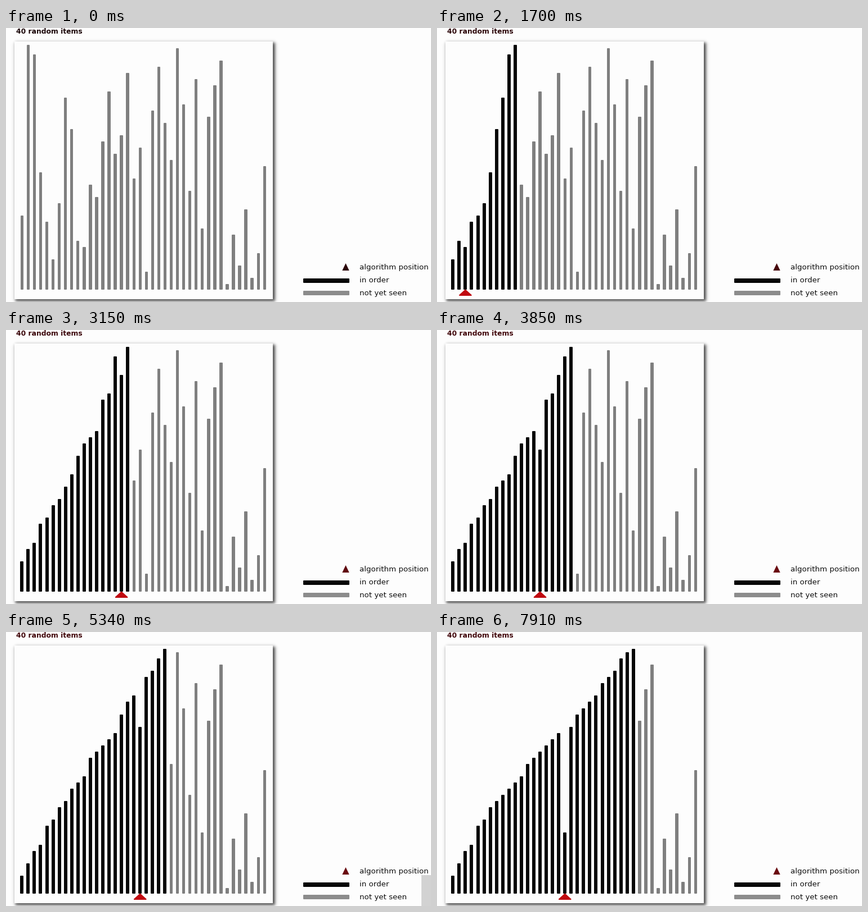
These frames come from a looping animation (755 by 488 pixels, 7990 ms). A matplotlib script:

```python
import numpy as np
import matplotlib.pyplot as plt
from matplotlib.animation import FuncAnimation
from matplotlib.collections import PolyCollection
from matplotlib.patches import Polygon, Rectangle

W, H, DPI = 755, 488, 64
PT = 72 / DPI                      # points per pixel
LOOP, INTERVAL = 7990, 17

# the shuffled ranks to be sorted
ITEMS = [12, 40, 38, 19, 11, 5, 14, 31, 26, 8, 7, 17, 15, 24, 32, 22, 25, 35, 18, 23,
         3, 29, 36, 27, 21, 39, 30, 16, 34, 10, 28, 33, 37, 1, 9, 4, 13, 2, 6, 20]
BLACK, GRAY = "#060606", "#7f7f7f"
X0, PITCH, TOP, FLOOR = 28.3, 11.05, 30, 466.3


def insertion_states(items):
    """Every state of the sort: (items, how many are in order, position)."""
    a = list(items)
    states = [(a[:], 0, None)]
    for i in range(len(a)):
        j = i
        states.append((a[:], i + 1, j))
        while j > 0 and a[j] < a[j - 1]:
            a[j - 1], a[j] = a[j], a[j - 1]
            j -= 1
            states.append((a[:], i + 1, j))
    return states


STATES = insertion_states(ITEMS)


def tick_at(t):
    """Number of redraws so far; the pace drifts slightly."""
    return int(np.interp(t, [30, 1010, 3850, 7910], [1, 14, 51, 103], left=0))


def state_at(tick):
    """Each redraw advances the sort by just under two steps."""
    return STATES[round(1.34 + 1.975 * tick) if tick else 0]


def box(x0, y0, x1, y1):
    """Rectangle inset by one pixel; a two-pixel round edge fills it out."""
    return [(x0 + 1, y0 + 1), (x1 - 1, y0 + 1), (x1 - 1, y1 - 1), (x0 + 1, y1 - 1)]


def bar(i, value, done):
    x = X0 + i * PITCH
    half = 3.0 if done else 2.7
    return box(x - half, max(TOP, 467 - PITCH * value), x + half, FLOOR)


def pointer(x):
    return [(x - 10.4, 476), (x, 466.6), (x + 10.4, 476)]


def blend(c0, c1, u):
    return tuple((np.array(c0) * (1 - u) + np.array(c1) * u) / 255)


def backdrop():
    """White page with a white card and its soft shadow."""
    def ramp(v):
        return 1 / (1 + np.exp(-v / 1.6))
    x, y = np.arange(W) + 0.5, np.arange(H) + 0.5
    across = ramp(x - 16.5) * ramp(478 - x)
    down = ramp(y - 26) * ramp(486.5 - y)
    page = 0.996 - 0.7 * np.outer(down, across)
    page[24:483, 15:474] = 0.996
    return np.repeat(np.clip(page, 0, 1)[:, :, None], 3, axis=2)


fig = plt.figure(figsize=(W / DPI, H / DPI), dpi=DPI, facecolor="white")
fig.figimage(backdrop(), origin="upper", zorder=-5)
ax = fig.add_axes([0, 0, 1, 1], zorder=1)
ax.set_xlim(0, W)
ax.set_ylim(H, 0)
ax.axis("off")


def label(x, y, text, size, **kw):
    return ax.text(x, y, text, fontsize=size * PT, family="DejaVu Sans",
                   va="baseline", ha="left", **kw)


def shape(points, color):
    return ax.add_patch(Polygon(points, facecolor=color, edgecolor=color,
                                linewidth=2 * PT, joinstyle="round"))


title = label(17.5, 10, "40 random items", 12.36, weight="bold")
for row, text in enumerate(("algorithm position", "in order", "not yet seen")):
    label(628, 430 + 22.8 * row, text, 13.4, color="#101010")
shape(box(528, 446, 610, 454), BLACK)
shape(box(528, 468, 610, 476), "#8c8c8c")
key = ax.add_patch(Polygon([(597.3, 432), (603.5, 419), (609.7, 432)], linewidth=0))

bars = ax.add_collection(PolyCollection([], linewidths=2 * PT, joinstyle="round"),
                         autolim=False)
marker = shape(pointer(X0), "#c00a10")
marker.set_zorder(3)
corner = ax.add_patch(Rectangle((738, 433), 17, 55, color="#d2d2d2", linewidth=0))


def draw(n):
    t = (n + 1) * INTERVAL - 1
    tick = tick_at(t)
    items, done, pos = state_at(tick)

    colors = [BLACK if i < done else GRAY for i in range(len(items))]
    bars.set_verts([bar(i, v, i < done) for i, v in enumerate(items)])
    bars.set_facecolor(colors)
    bars.set_edgecolor(colors)

    marker.set_visible(pos is not None)
    if pos is not None:
        marker.set_xy(pointer(X0 + pos * PITCH))

    warm = min(1, t / 3800)
    title.set_color(blend((28, 8, 10), (66, 8, 12), warm))
    key.set_facecolor(blend((44, 6, 10), (106, 10, 16), warm))
    corner.set_visible(62 <= tick < 74)
    return bars, marker, title, key, corner


anim = FuncAnimation(fig, draw, frames=LOOP // INTERVAL, interval=INTERVAL,
                     repeat=True, repeat_delay=0, blit=False)
plt.show()
```
